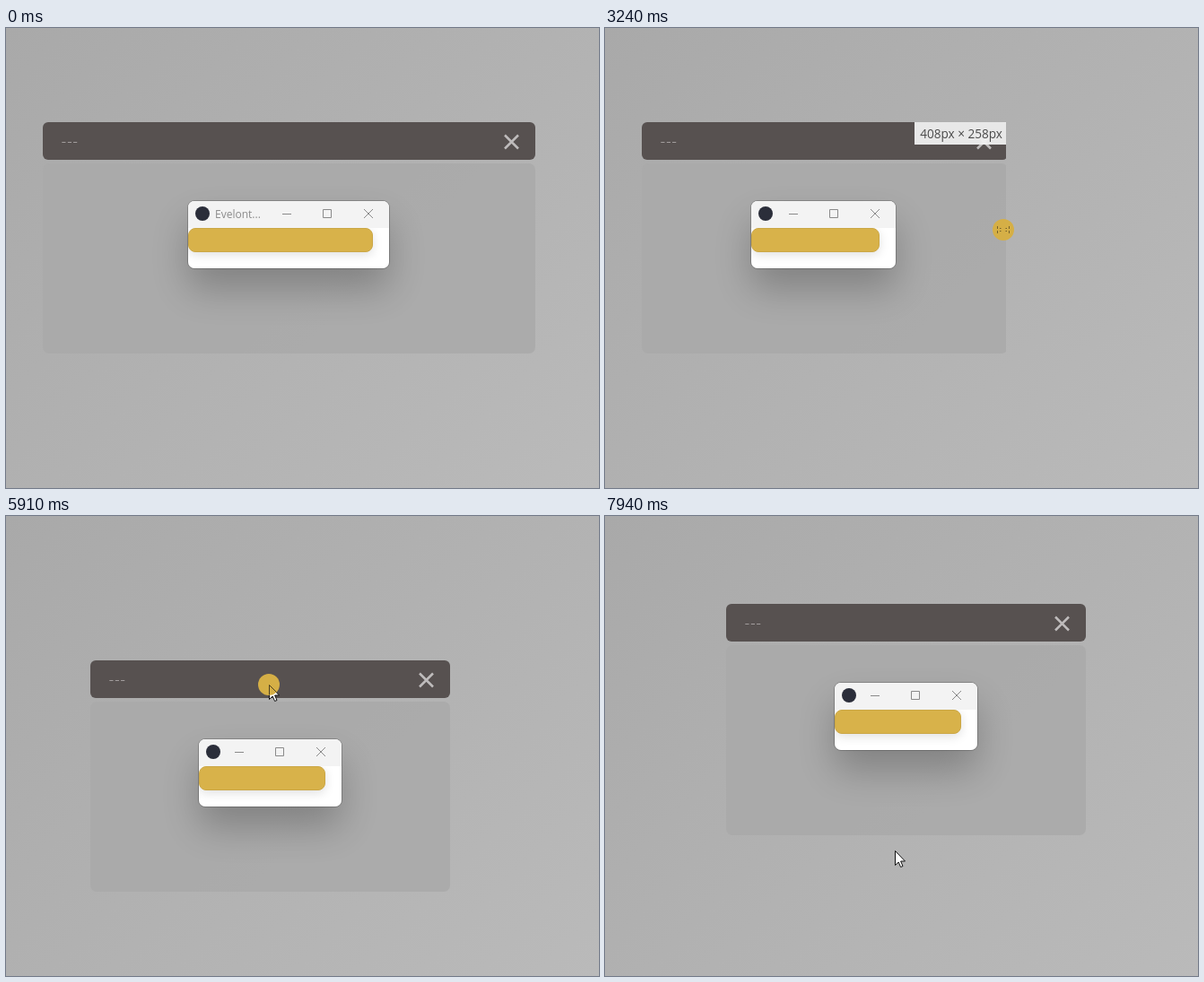
Animation, 661 px wide and 513 px high, one loop 8000 ms. Source, as an HTML page:

```html
<!DOCTYPE html>
<html lang="en">
<head>
<meta charset="utf-8">
<title>Resizable window</title>
<style>
  html, body { margin: 0; width: 100%; height: 100%; overflow: hidden; background: #b1b1b1; }
  svg { display: block; width: 661px; height: 513px; }
  text { font-family: "Open Sans", "Noto Sans", sans-serif; }
</style>
</head>
<body>
<svg viewBox="0 0 661 513" xmlns="http://www.w3.org/2000/svg">
  <defs>
    <linearGradient id="bg" gradientUnits="userSpaceOnUse" x1="37" y1="-37" x2="624" y2="550">
      <stop offset="0" stop-color="#a9a9a9"/>
      <stop offset="1" stop-color="#bababa"/>
    </linearGradient>
    <filter id="wide" x="-60%" y="-120%" width="220%" height="340%"><feGaussianBlur stdDeviation="21"/></filter>
    <filter id="near" x="-20%" y="-60%" width="140%" height="220%"><feGaussianBlur stdDeviation="6"/></filter>
    <clipPath id="frame"><rect id="frameBox" y="-2" width="549" height="264"/></clipPath>
    <clipPath id="round"><rect id="roundBox" width="224" height="75" rx="7"/></clipPath>
  </defs>
  <rect width="661" height="513" fill="url(#bg)"/>

  <g id="panel">
    <g clip-path="url(#frame)">
      <rect id="body" y="46" height="212" rx="7" fill="#aaa" fill-opacity=".85"/>
      <rect id="bar" height="42" rx="6" fill="#575150"/>
      <text x="20.5" y="27" font-size="18" font-weight="300" letter-spacing=".6" fill="#bdb9b9">---</text>
      <path id="close" d="M-7.5 -7.5L7.5 7.5M7.5 -7.5L-7.5 7.5" stroke="#bfbcbc" stroke-width="2.5" fill="none"/>
      <g id="app">
        <rect id="shade" y="23" height="75" rx="8" fill="#000" opacity=".23" filter="url(#wide)"/>
        <rect id="rim" x="-.5" y="-.5" height="76" rx="7.5" fill="none" stroke="#000" stroke-opacity=".2"/>
        <g clip-path="url(#round)">
          <rect id="white" height="75" fill="#fff"/>
          <rect id="glow" y="33" height="27" rx="8" fill="#000" opacity=".12" filter="url(#near)"/>
          <rect id="cap" height="30" fill="#f3f3f3"/>
          <rect id="gold" x=".5" y="30.5" height="26" rx="7.5" fill="#d8b24a" stroke="#cba746"/>
        </g>
        <circle cx="16" cy="14" r="8" fill="#2b2e3a"/>
        <text id="name" x="30" y="19" font-size="12" fill="#8b8b8b"></text>
        <g id="buttons" fill="none" stroke="#8a8a8a">
          <path d="M-119 14.5h10M-73.5 9.5h9v9h-9z"/>
          <path d="M-28 9l10 10M-18 9l-10 10"/>
        </g>
      </g>
    </g>
    <g id="tip">
      <rect x="-102" width="102" height="25" fill="#f1f1f1" fill-opacity=".95"/>
      <text id="size" x="-4" y="18" font-size="13.6" text-anchor="end" fill="#4a4a4a"></text>
    </g>
  </g>

  <g id="pointer">
    <path id="arrow" d="M.5 .5V16.5L4.2 13L6.6 18.5L9 17.5L6.6 12H11.5Z" fill="#fff" stroke="#111"/>
    <path id="sizer" d="M-11 0L-6.5 -4V-1.5H6.5V-4L11 0L6.5 4V1.5H-6.5V4Z" fill="#fff" stroke="#111"/>
    <circle id="press" r="12" fill="#d5af46"/>
    <path id="arrowLine" d="M.5 11.5V.5L8.5 8.5" fill="none" stroke="#4c4020"/>
    <path id="sizerLine" d="M-6.5 -4v3m0 2v3M6.5 -4v3m0 2v3M-4 -1.5h1.5M-4 1.5h1.5M2.5 -1.5h1.5M2.5 1.5h1.5" fill="none" stroke="#4c4020" stroke-opacity=".7"/>
  </g>
</svg>
<script>
const LOOP = 8000, STEP = 70;
const STARTS = [260, 1840, 2680, 3840, 4040, 4860, 7450];
const LEAD = 12; // ms the hand runs ahead of what it drags
const NAME = "Evelont";
const HOME = [41, 105], REST = [135, 98];

const $ = id => document.getElementById(id);
const set = (id, attrs) => { for (const k in attrs) $(id).setAttribute(k, attrs[k]); };
const move = (id, x, y) => set(id, { transform: `translate(${Math.round(x * 2) / 2} ${Math.round(y)})` });
const show = (id, on) => set(id, { visibility: on ? "visible" : "hidden" });

const part = (t, from, to) => Math.min(1, Math.max(0, (t - from) / (to - from)));
const smooth = u => u * u * (3 - 2 * u);
const easeOut = (u, power) => 1 - (1 - u) ** power;
const mix = (a, b, u) => a + (b - a) * u;
const mixPoint = (p, q, u) => [mix(p[0], q[0], u), mix(p[1], q[1], u)];

function snap(t) {
  const start = STARTS.filter(s => s <= t).pop();
  return start === undefined ? t : start + Math.floor((t - start) / STEP) * STEP;
}

const shrink = t => easeOut(part(t, 1770, 3390), 1.45);
const edge = t => mix(590, 442, shrink(t));

// Counter-clockwise circling that speeds up and grows taller
function orbit(t) {
  const since = t - 5280;
  const angle = (-70 + since * (since < 0 ? 0.245 : 0.5)) * Math.PI / 180;
  const tall = Math.min(54, 27.7 + since * 0.0384);
  return [124.5 + 72 * Math.cos(angle), 114 - tall * Math.sin(angle)];
}

// Lift off, circle, then swing up past the resting place and settle
function panelAt(t) {
  if (t < 6640) return mixPoint(HOME, orbit(t), smooth(part(t, 4790, 5180)));
  const u = part(t, 6640, 7200), [x, y] = orbit(6640);
  return [mix(x, REST[0], u), mix(REST[1], y, (1 - u) * Math.cos(3.85 * u))];
}

function pointerAt(t) {
  if (t < 1240) return mixPoint([625, 500], [588, 215], easeOut(part(t, 260, 1240), 2.5));
  if (t < 3840) return [edge(t + LEAD) - 2, mix(215, 225, shrink(t))];
  if (t < 4860) return mixPoint([437, 225], [233, 129], smooth(part(t, 3970, 4600)));
  if (t < 7450) {
    const [x, y] = panelAt(t + LEAD);
    return [x + 192, y + 24];
  }
  const u = smooth(part(t, 7380, 7940));
  return [mix(329, 323, u) + 14 * Math.sin(Math.PI * u), mix(122, 373, u)];
}

function title(room) {
  const n = Math.floor((room - 12) / 6.2);
  if (n >= 1) return NAME.slice(0, n) + "...";
  return room > 12 ? "..." : "";
}

function drawPanel(t, now) {
  const [x, y] = panelAt(t).map(Math.round);
  const width = Math.round(edge(t)) - 41;
  const sizing = shrink(t) > 0 && shrink(t) < 1;
  const full = width + (sizing ? 2 : 0); // contents lag behind the frame
  const inner = Math.floor(159 + (width - 401) * 0.44);

  move("panel", x, y);
  set("frameBox", { width });
  set("body", { width: full });
  set("bar", { width: full });
  move("close", full - 26.5, 22);

  move("app", Math.floor(121 + (width - 401) * 0.278), 88);
  for (const id of ["roundBox", "shade", "white", "cap"]) set(id, { width: inner });
  set("rim", { width: inner + 1 });
  set("glow", { width: inner - 18 });
  set("gold", { width: inner - 19 });
  move("buttons", inner, 0);
  $("name").textContent = title(inner - 168);

  show("tip", now >= 1840 && now < 4350);
  move("tip", width, 0);
  $("size").textContent = `${width + 2}px × 258px`;
}

function drawPointer(t, now) {
  const pressed = (now >= 1570 && now < 3640) || (now >= 4730 && now < 7450);
  const sizer = now >= 1100 && now < 3840;
  const on = now >= 260;

  move("pointer", ...pointerAt(t).map(Math.round));
  show("arrow", on && !sizer);
  show("sizer", on && sizer && !pressed);
  show("press", pressed);
  show("arrowLine", pressed && !sizer);
  show("sizerLine", pressed && sizer);
}

function draw(now) {
  const t = snap(now);
  drawPanel(t, now);
  drawPointer(t, now);
}

const begin = performance.now();
function tick() {
  draw((performance.now() - begin) % LOOP);
  requestAnimationFrame(tick);
}
tick();
</script>
</body>
</html>
```
